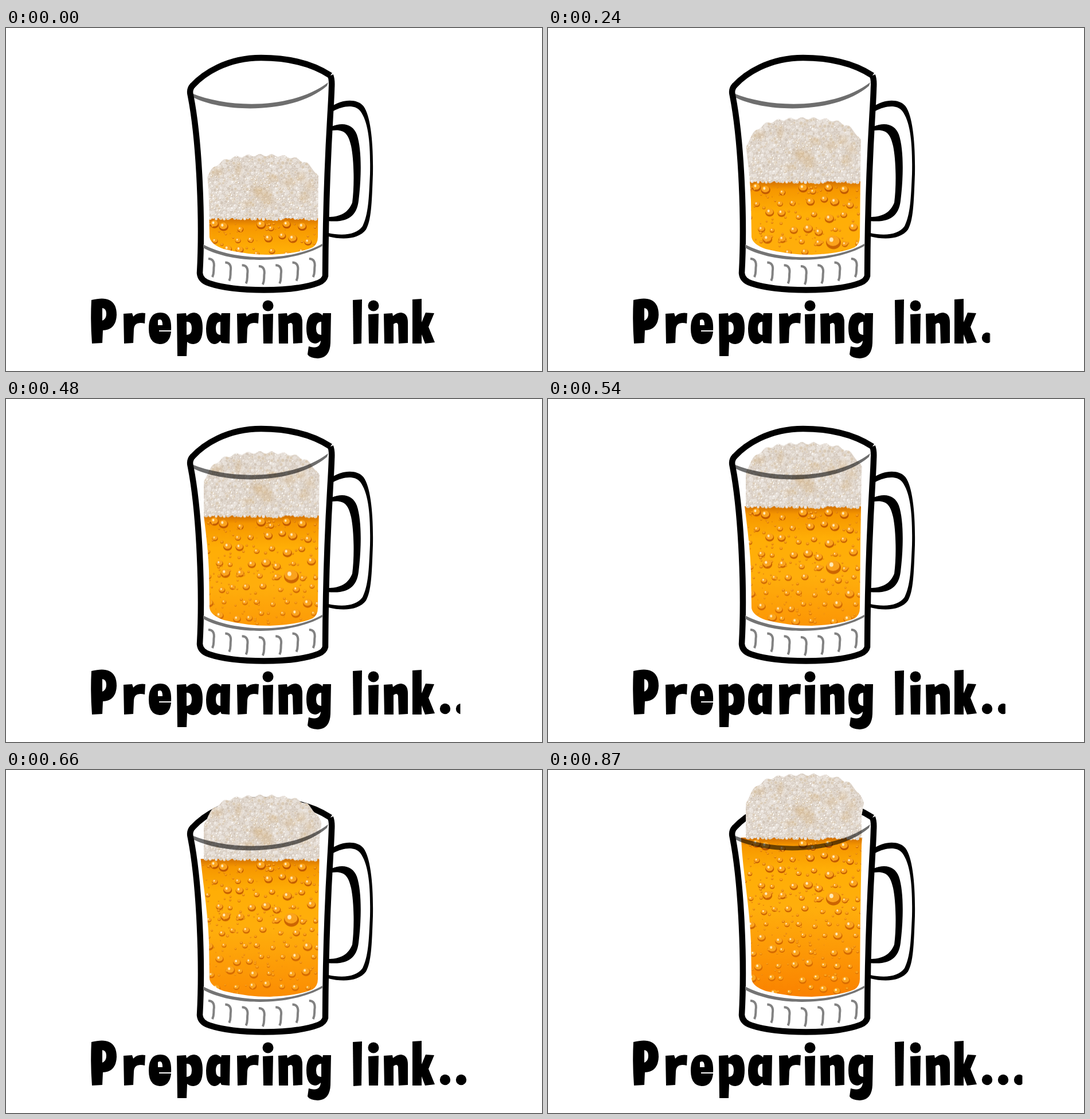
An HTML page that plays this animation: 935x599 px, repeating every 900 ms.

```html
<!DOCTYPE html>
<html lang="en">
<head>
<meta charset="utf-8">
<title>Preparing link</title>
<style>
  html, body { margin: 0; width: 100%; height: 100%; overflow: hidden; background: #fff; }
  svg { display: block; width: 100%; height: 100%; }
  .label { position: absolute; width: 1px; height: 1px; overflow: hidden; clip-path: inset(50%); font-family: Lato, sans-serif; }
  .rise { animation: rise 900ms -1ms infinite; }
  .wipe { animation: wipe 900ms -1ms steps(30) infinite; }
  @keyframes rise {
    0% { transform: translateY(214px); animation-timing-function: steps(26); }
    86.667% { transform: translateY(5px); animation-timing-function: step-end; }
    90%, 100% { transform: translateY(0); }
  }
  @keyframes wipe {
    from { transform: translateX(0); }
    to { transform: translateX(80.6px); }
  }
</style>
</head>
<body>
<span class="label">Preparing link...</span>
<svg viewBox="0 0 935 599" aria-hidden="true">
  <defs>
    <linearGradient id="beer" gradientUnits="userSpaceOnUse" x1="0" y1="118" x2="0" y2="395">
      <stop offset="0" stop-color="#d27000"/>
      <stop offset=".05" stop-color="#f69700"/>
      <stop offset=".2" stop-color="#ffae06"/>
      <stop offset=".45" stop-color="#ffae0c"/>
      <stop offset="1" stop-color="#fa8200"/>
    </linearGradient>
    <linearGradient id="shade" gradientUnits="userSpaceOnUse" x1="0" y1="118" x2="0" y2="395">
      <stop offset="0" stop-color="#b34a00"/>
      <stop offset="1" stop-color="#d96c00"/>
    </linearGradient>
    <radialGradient id="stain">
      <stop offset="0" stop-color="#cda264" stop-opacity=".3"/>
      <stop offset="1" stop-color="#cda264" stop-opacity="0"/>
    </radialGradient>
    <clipPath id="inside">
      <path d="M330 0L337 122C340 180 352 240 354 300L355 365Q357 378 380 386Q420 396 460 396Q510 394 535 383Q544 377 544 365L545 250L547 130L552 70V0Z"/>
    </clipPath>
    <clipPath id="head"></clipPath>
    <clipPath id="gap"><ellipse class="rise" cx="475" cy="30" rx="14" ry="1.8"/></clipPath>
    <path id="rim" d="M325 101C344 80 385 52 445 52C500 52 540 66 566 83"/>
    <path id="r" d="M205 499L220 498L222 504Q229 496 243 498L242 516Q224 512 223 526L222 550L206 551Z"/>
    <path id="n" d="M475 499L490 498L491 503Q498 497 505 497Q517 498 517 514V550L501 551L500 519Q499 512 492 517V551H476Z"/>
    <g id="i"><path d="M448 500L466 499L465 551L449 551Z"/><circle cx="457" cy="485" r="9.500"/></g>
  </defs>

  <path d="M568 137C585 125 612 122 624 137C636 154 641 200 640 255C638 310 637 335 628 352C616 368 590 371 562 364V358C590 364 612 360 622 346C632 325 633 300 635 255C636 205 633 165 618 145C608 133 588 136 571 145Z"/>
  <path d="M568 172C590 163 606 170 612 186C621 212 620 262 615 302C612 325 600 341 561 337V330C580 330 596 325 604 305C608 275 607 230 602 206C597 184 590 176 568 179Z"/>
  <g fill="none" stroke="#000" stroke-width="10.500" stroke-linejoin="round">
    <use href="#rim"/>
    <path d="M566 83Q569 90 568 105C567 150 558 230 557 433Q555 441 545 445C500 462 400 461 355 446Q339 441 338 428C343 340 338 200 322 118Q319 107 326 100"/>
  </g>

  <g clip-path="url(#inside)">
    <g class="rise">
      <path fill="url(#beer)" d="M325 118H560V420H325Z"/>
      <g id="drops"/>
      <g id="foam" clip-path="url(#head)"/>
    </g>
  </g>
  <g clip-path="url(#gap)">
    <use href="#rim" fill="none" stroke="#000" stroke-opacity=".4" stroke-width="10.500"/>
  </g>

  <path fill-opacity=".57" d="M324 114C390 141 500 142 562 95L560 101C505 149 385 150 326 121Z"/>
  <path fill="#747474" d="M344 378C400 408 500 408 553 376V380C500 411 400 414 344 384Z"/>
  <g id="hooks" fill="none" stroke="#828282" stroke-width="4"/>

  <g fill-rule="evenodd">
    <path d="M149 475Q170 470 180 475Q193 481 193 501Q192 527 169 528L168 550L150 551Q147 512 149 475ZM168 489V511Q175 508 175 499Q175 490 168 489Z"/>
    <use href="#r"/>
    <path d="M269 497C284 497 289 508 288 528H267V530H288Q286 552 268 552Q249 551 249 525Q249 497 269 497ZM265 511V519H273Q273 509 269 509Q265 509 265 511Z"/>
    <path d="M298 499L314 498L315 503Q321 497 328 497Q343 498 343 524Q343 551 327 552Q320 552 316 548L315 573H299ZM315 513V536Q324 536 324 525Q324 512 315 513Z"/>
    <path d="M391 498L390 551L376 550L374 546Q369 552 363 552Q349 550 349 525Q350 498 365 497Q371 497 375 502L376 498ZM374 513Q366 513 366 525Q366 536 374 536Z"/>
    <use href="#r" x="198"/>
    <use href="#i"/>
    <use href="#n"/>
    <path d="M567 498L566 550Q565 576 544 577Q529 576 526 570L528 556Q548 562 549 546Q544 551 539 551Q524 550 524 524Q524 498 541 497Q548 497 552 502L553 498ZM550 513Q541 513 541 525Q541 536 550 536Z"/>
    <path d="M605 475L621 474L620 551L606 552Z"/>
    <use href="#i" x="184"/>
    <use href="#n" x="184"/>
    <path d="M709 474L725 473V514L732 497L747 498L737 522L748 549L731 551L725 535V551H709Z"/>
    <circle cx="766" cy="541" r="9.200"/>
    <circle cx="794" cy="541" r="9.200"/>
    <circle cx="822" cy="541" r="9.200"/>
  </g>
  <path class="wipe" fill="#fff" d="M749.500 525H849V560H749.500Z"/>
</svg>
<script>
  let seed = 7;
  const rand = (lo, hi) => {
    seed = (seed * 16807) % 2147483647;
    return lo + (hi - lo) * seed / 2147483647;
  };
  const disc = (x, y, rx, ry = rx) => {
    const [a, b, w, h] = [x - rx, y, rx, ry].map(v => v.toFixed(1));
    return `M${a} ${b}a${w} ${h} 0 1 0 ${2 * w} 0a${w} ${h} 0 1 0 ${-2 * w} 0`;
  };
  const add = (id, d, attrs) => {
    const path = document.createElementNS('http://www.w3.org/2000/svg', 'path');
    for (const [k, v] of Object.entries({ d, ...attrs })) path.setAttribute(k, v);
    document.getElementById(id).append(path);
  };

  // Domed foam outline with a bumpy top
  let dome = 'M345 123';
  for (let u = -1; u <= 1.001; u += 0.02) {
    const y = 8 + 16 * u * u + 34 * u ** 6 + 2 * Math.sin(u * 31);
    dome += `L${(448 + 103 * u).toFixed(1)} ${y.toFixed(1)}`;
  }
  add('head', dome + 'L547 80V123Z');
  add('foam', 'M340 0H556V118H340Z', { fill: '#d8cdc2' });

  // Jittered rows of small bubbles in a few tones
  const tones = ['#d2c6b9', '#ddd4ca', '#e6dfd8', '#d9cab6'];
  const cells = tones.map(() => '');
  let glints = '';
  for (let y = 6, row = 0; y < 120; y += 5.6, row++) {
    for (let x = 343 + (row % 2) * 3; x < 553; x += 6.2) {
      const bx = x + rand(-1.8, 1.8), by = y + rand(-1.6, 1.6), r = rand(2, 3.5);
      cells[Math.floor(rand(0, tones.length))] += disc(bx, by, r);
      if (rand(0, 1) < 0.2 + y / 220) glints += disc(bx - 0.8, by - 0.9, rand(0.7, 1.3));
    }
  }
  cells.forEach((d, i) => add('foam', d, {
    fill: tones[i], stroke: '#f4efe9', 'stroke-width': 0.8, 'stroke-opacity': 0.7
  }));
  add('foam', glints, { fill: '#fffdfa' });
  for (let i = 0; i < 12; i++)
    add('foam', disc(rand(365, 530), rand(30, 95), rand(8, 20), rand(8, 16)), { fill: 'url(#stain)' });

  // Condensation: one big drop, a loose grid of drops, fine drops crowding the top
  let dark = '', body = '', shine = '';
  const drop = (x, y, r) => {
    dark += disc(x, y + r * 0.08, r, r * 0.88);
    body += disc(x - r * 0.06, y - r * 0.16, r * 0.86, r * 0.7);
    if (r > 3) shine += disc(x - r * 0.28, y - r * 0.32, r * 0.26, r * 0.3);
  };
  drop(498, 224, 13);
  for (let y = 132, row = 0; y < 390; y += 23, row++)
    for (let x = 358 + (row % 2) * 13; x < 550; x += 27)
      drop(x + rand(-7, 7), y + rand(-6, 6), rand(4, 8.5));
  for (let i = 0; i < 200; i++) drop(rand(340, 548), 128 + 264 * rand(0, 1) ** 1.5, rand(0.8, 2.8));
  add('drops', dark, { fill: 'url(#shade)', 'fill-opacity': 0.85 });
  add('drops', body, { fill: '#fba31c' });
  add('drops', shine, { fill: '#ffe9b8' });

  for (let i = 0; i < 7; i++)
    add('hooks', 'M0 1C8 1 11 7 9.500 16C9 25 10 27 7 33', {
      transform: `translate(${353 + 29.3 * i} ${402 + 13 * Math.sin(Math.PI * i / 6)})`
    });
</script>
</body>
</html>
```
